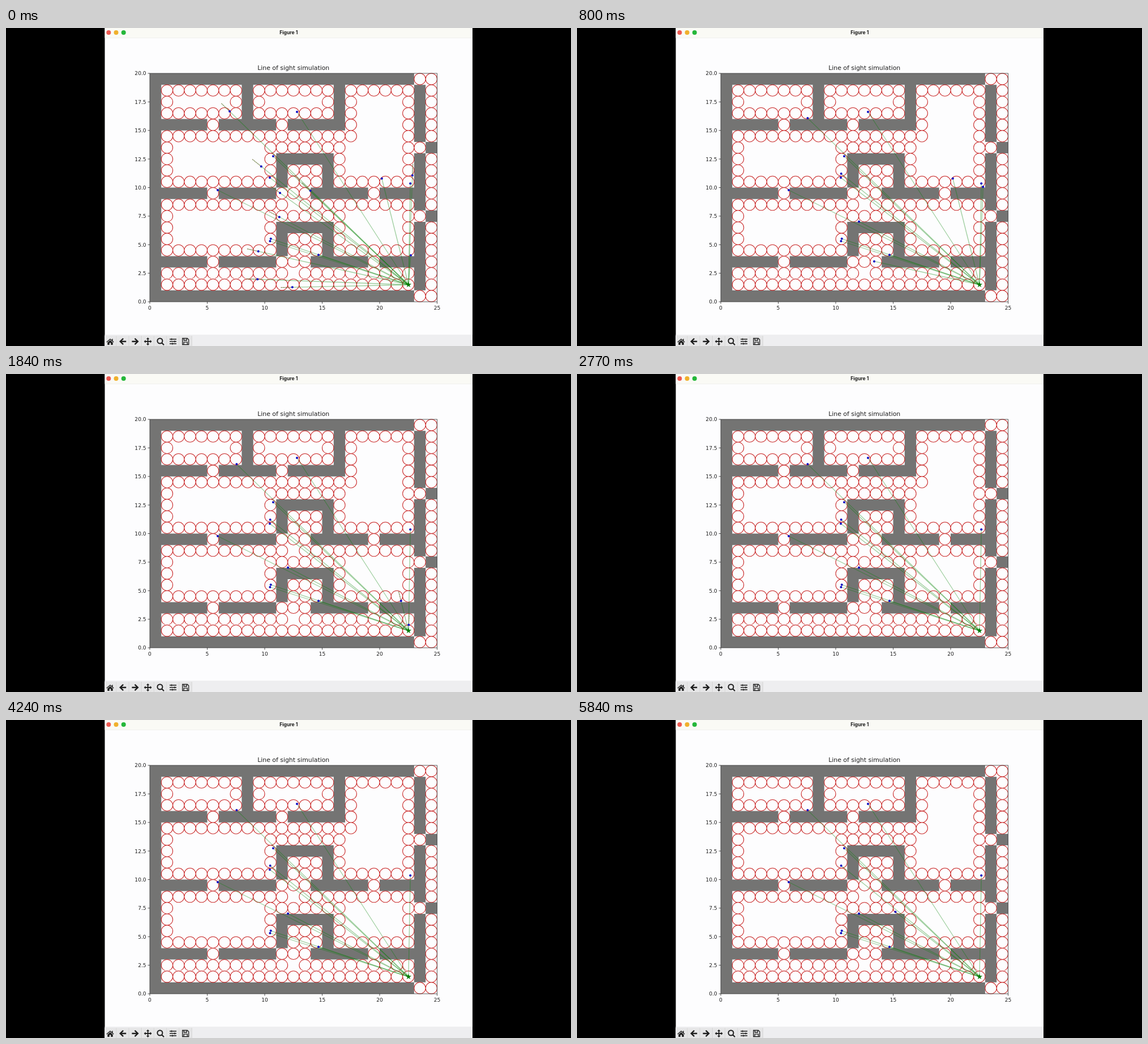
Write an HTML page with a canvas that moves like this. It is 998 px wide and 561 px high and loops after 5900 ms.

```html
<!DOCTYPE html>
<html lang="en">
<head>
<meta charset="utf-8">
<title>Line of sight simulation</title>
<style>
  html, body { margin: 0; width: 100%; height: 100%; overflow: hidden; background: #000; }
  canvas { display: block; }
</style>
</head>
<body>
<canvas id="stage" width="998" height="561"></canvas>
<script>
const ctx = document.getElementById('stage').getContext('2d');
const LOOP = 5900, TICK = 46, STRIDE = 20.3;
const COLS = 25, ROWS = 20, LEFT = 254, BOTTOM = 483, UX = 20.3, UY = 20.15;
const WIN_X = 174.5, WIN_W = 649.5;
const GOAL = [711, 453];
const px = x => LEFT + x * UX;
const py = y => BOTTOM - y * UY;

// Floor plan: outer walls, three partitions with doors, two alcoves, two closets
function isWall(x, y) {
  if (x === 24) return y === 7 || y === 13;
  if (x === 23) return y > 0 && y % 6 !== 1 || y === 1;
  if (x === 0 || y === 0 || y === 19) return true;
  if (y === 15) return x < 17 && x !== 5 && x !== 11;
  if (y % 6 === 3) return x !== 5 && x !== 19 && (x < 11 || x > 13);
  if (y > 15) return x === 8 || x === 16;
  const depth = (y - 4) % 6;
  if (depth < 0 || depth > 2) return false;
  return x === 11 || x === 15 || depth === 2 && x > 11 && x < 15;
}

const touchesWall = (x, y) =>
  [-1, 0, 1].some(dx => [-1, 0, 1].some(dy => isWall(x + dx, y + dy)));
const hitsWall = ([x, y]) =>
  isWall(Math.floor((x - LEFT) / UX), Math.floor((BOTTOM - y) / UY));

// Agents: start x, y, then the times at which they may break through a wall
const agents = [
  [514, 148], [472, 226.3], [374, 286], [467.7, 371.8], [466.4, 376], [552, 400.3], [714.2, 274.2],
  [380.4, 133], [435, 231.5], [464.8, 324], [425.9, 389.6, 1270], [424, 442.5], [485.5, 457.8],
  [466, 264, 5190], [467.5, 279.2, 260, 600], [523, 273, 200, 600],
  [718.6, 239.7, 1100, 1760], [715, 401, 300], [663.8, 265.5, 1550, 2440]
];

// Every tick an agent strides straight at the goal, or shortens its stride, or waits at a wall
function walk([x, y, ...breaks]) {
  let pos = [x, y];
  const trail = [pos];
  for (let t = 0; t <= LOOP; t += TICK) {
    const dx = GOAL[0] - pos[0], dy = GOAL[1] - pos[1], dist = Math.hypot(dx, dy);
    if (dist < STRIDE) break;
    const ahead = part => [pos[0] + dx * part * STRIDE / dist, pos[1] + dy * part * STRIDE / dist];
    const canPass = part => hitsWall(pos) || !hitsWall(ahead(part));
    if (canPass(1)) pos = ahead(1);
    else if (canPass(0.85)) pos = ahead(0.85);
    else if (t >= breaks[0]) {
      breaks.shift();
      pos = ahead(1);
    }
    trail.push(pos);
  }
  return trail;
}
const trails = agents.map(walk);

function rect(color, x, y, w, h) {
  ctx.fillStyle = color;
  ctx.fillRect(x, y, w, h);
}

function disc(color, x, y, r) {
  ctx.fillStyle = color;
  ctx.beginPath();
  ctx.arc(x, y, r, 0, 7);
  ctx.fill();
}

function line(color, width, ...points) {
  ctx.strokeStyle = color;
  ctx.lineWidth = width;
  ctx.beginPath();
  points.forEach(([x, y]) => ctx.lineTo(x, y));
  ctx.stroke();
}

function text(str, x, y, font, align = 'center') {
  ctx.fillStyle = '#1c1c1c';
  ctx.font = font;
  ctx.textAlign = align;
  ctx.fillText(str, x, y);
}

// Toolbar icons centred on 0,0: path, and a line width where the path is stroked
const arrow = 'M6 -1.2H-1.5L1.8 -4.4L0 -6L-6.2 0L0 6L1.8 4.4L-1.5 1.2H6Z';
const icons = [
  ['M0 -5L-6.7 .8L-5.8 1.8L0 -3.2L5.8 1.8L6.7 .8L4.6 -1V-4.4H3V-2.4Z M0 -2.2L-4.7 1.9V6H-1.3V2.6H1.3V6H4.7V1.9Z'],
  [arrow],
  [arrow],
  ['M0 -7L2.7 -4H.9V-.9H4V-2.7L7 0L4 2.7V.9H.9V4H2.7L0 7L-2.7 4H-.9V.9H-4V2.7L-7 0L-4 -2.7V-.9H-.9V-4H-2.7Z'],
  ['M3.6 -1A4.5 4.5 0 1 1 -5.4 -1A4.5 4.5 0 1 1 3.6 -1M2.3 2.2L6.2 6.2', 2],
  ['M-6 -4H6M-6 0H6M-6 4H6M-2.5 -5.5V-2.5M3 -1.5V1.5M-1 2.5V5.5', 1.4],
  ['M-5.5 -5.5H3.2L5.5 -3.2V5.5H-5.5ZM-3 -5.5V-2H2V-5.5M-3.2 5.5V1.2H3.2V5.5', 1.3]
].map(([d, width]) => ({ path: new Path2D(d), width }));

function drawToolbar() {
  rect('#eeeef0', WIN_X, 541, WIN_W, 20);
  icons.forEach(({ path, width }, i) => {
    const x = 184 + i * 22.2;
    rect('#e6e6e7', x - 10, 543, 21, 18);
    line('#cfcfcf', 0.8, [x + 11, 543], [x + 11, 561]);
    ctx.save();
    ctx.translate(x, 553);
    if (i === 2) ctx.scale(-1, 1);
    ctx.fillStyle = ctx.strokeStyle = '#1e1e1e';
    if (width) {
      ctx.lineWidth = width;
      ctx.stroke(path);
    } else ctx.fill(path);
    ctx.restore();
  });
}

function drawWindow() {
  rect('#000', 0, 0, 998, 561);
  rect('#fdfdfe', WIN_X, 0, WIN_W, 561);
  rect('#fafaf5', WIN_X, 0, WIN_W, 17);
  rect('#ececea', WIN_X, 17, WIN_W, 0.7);
  ['#ee5a52', '#f0b02c', '#25b73a'].forEach((c, i) => disc(c, 181.3 + i * 13.2, 8, 4));
  text('Figure 1', 499.3, 10.8, 'bold 8.6px Inter, sans-serif');
  drawToolbar();
}

function drawRooms() {
  const blocks = new Path2D(), rings = new Path2D();
  for (let y = 0; y < ROWS; y++)
    for (let x = 0; x < COLS; x++) {
      if (isWall(x, y)) blocks.rect(px(x), py(y + 1), UX, UY);
      else if (touchesWall(x, y)) {
        rings.moveTo(px(x + 1), py(y + 0.5));
        rings.ellipse(px(x + 0.5), py(y + 0.5), UX / 2, UY / 2, 0, 0, 2 * Math.PI);
      }
    }
  ctx.fillStyle = '#747473';
  ctx.fill(blocks);
  ctx.strokeStyle = '#ca2a2a';
  ctx.lineWidth = 1.05;
  ctx.stroke(rings);
}

function drawAxes() {
  const small = '9.1px "DejaVu Sans", sans-serif';
  text('Line of sight simulation', 507.7, 74.2, '10.9px "DejaVu Sans", sans-serif');
  ctx.strokeStyle = '#333';
  ctx.lineWidth = 0.8;
  ctx.strokeRect(LEFT, py(ROWS), COLS * UX, ROWS * UY);
  for (let v = 0; v <= COLS; v += 5) {
    line('#222', 0.8, [px(v), BOTTOM], [px(v), BOTTOM + 3.5]);
    text(v, px(v), 496.6, small);
  }
  for (let v = 0; v <= ROWS; v += 2.5) {
    line('#222', 0.8, [LEFT - 3.5, py(v)], [LEFT, py(v)]);
    text(v.toFixed(1), 247.6, py(v) + 3.4, small, 'right');
  }
}

function drawGoal() {
  ctx.fillStyle = '#007a00';
  ctx.beginPath();
  for (let i = 0; i < 10; i++) {
    const r = i % 2 ? 2.1 : 5.3, a = i * Math.PI / 5;
    ctx.lineTo(GOAL[0] + r * Math.sin(a), GOAL[1] - r * Math.cos(a));
  }
  ctx.fill();
}

// Sight lines start where the agent stood one tick ago
function drawAgents(t) {
  const step = Math.floor(t / TICK) + 1;
  const active = trails.filter(trail => step < trail.length);
  active.forEach(trail => line('rgba(0,128,0,0.38)', 1.3, trail[step - 1], GOAL));
  ctx.setLineDash([2.6, 1.2]);
  active.forEach(trail => line('#9a6a50', 0.9, trail[step - 1], trail[step]));
  ctx.setLineDash([]);
  active.forEach(trail => disc('#0808c4', ...trail[step], 2));
}

const start = performance.now();
function frame() {
  drawWindow();
  drawRooms();
  drawAxes();
  drawAgents((performance.now() - start) % LOOP);
  drawGoal();
  requestAnimationFrame(frame);
}
frame();
</script>
</body>
</html>
```
